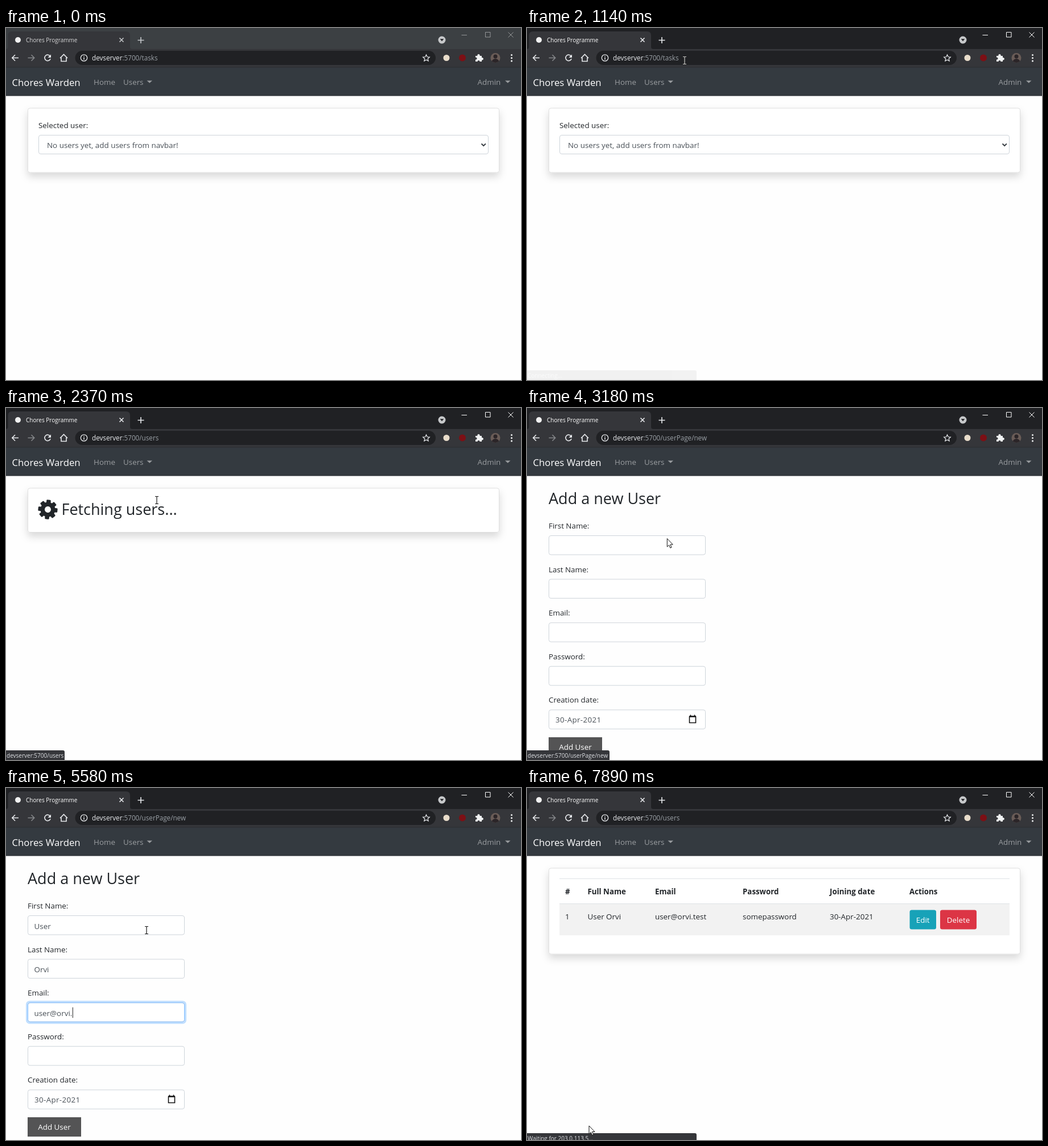
An HTML page for the animation above (8000 ms loop, 905 by 619 pixels).

```html
<!DOCTYPE html>
<html lang="en">
<head>
<meta charset="utf-8">
<title>Chores Programme</title>
<style>
  html, body { margin: 0; width: 100%; height: 100%; overflow: hidden; background: #fff; }
  svg { display: block; width: 905px; height: 619px; }
  text { font: 13.4px "Open Sans", "Noto Sans", sans-serif; fill: #212529; white-space: pre; }
  .ui { font-size: 10px; fill: #fff; }
  .url { font-size: 11.7px; fill: #9aa0a6; }
  .host { fill: #e8eaed; }
  .brand { font-size: 16.75px; fill: #fff; }
  .link { fill: #9a9da0; }
  .h2 { font-size: 27px; font-weight: 500; }
  .th { font-size: 13.3px; font-weight: 700; }
  .val { fill: #495057; }
  .btn { fill: #fff; text-anchor: middle; }
  .sug { font-size: 11.7px; fill: #fff; }
  .blue { fill: #8ab4f8; }
  .bold { font-weight: 600; }
  .line { fill: none; stroke: #e8eaed; stroke-width: 1.6; }
  .thin { fill: none; stroke: #fff; stroke-width: 1; }
  .card { fill: #fff; stroke: #dfdfdf; filter: url(#shadow); }
  .box { fill: #fff; stroke: #ced4da; }
  .ring { fill: none; stroke: #007bff; stroke-opacity: .25; stroke-width: 3; }
  #beam { mix-blend-mode: difference; }
</style>
</head>
<body>
<svg viewBox="0 0 905 619">
  <defs>
    <filter id="shadow" x="-10%" y="-30%" width="120%" height="180%">
      <feDropShadow dx="0" dy="7" stdDeviation="7" flood-color="#000" flood-opacity=".15"/>
    </filter>
    <clipPath id="face"><circle cx="860" cy="52.5" r="8.5"/></clipPath>
  </defs>
  <rect width="905" height="619" fill="#fefefe"/>

  <!-- pages -->
  <g id="todos">
    <rect class="card" x="38.5" y="141" width="828" height="113" rx="3.5"/>
    <text x="57" y="175.5">Selected user:</text>
    <rect class="box" x="57.5" y="188.5" width="790" height="33" rx="3.5"/>
    <text class="val" x="72" y="211">No users yet, add users from navbar!</text>
    <path d="M835.5 203.5l3.7 3.7 3.7-3.7" fill="none" stroke="#343a40" stroke-width="1.8"/>
  </g>
  <g id="fetch">
    <rect class="card" x="38.5" y="141" width="828" height="77.5" rx="3.5"/>
    <g id="gear" fill="#212529"></g>
    <text class="h2" x="97.5" y="188">Fetching users...</text>
  </g>
  <g id="table">
    <rect class="card" id="tableCard" x="38.5" y="141" width="828" height="151" rx="3.5"/>
    <path d="M57 159.5H848M57 203.5H848" stroke="#dee2e6"/>
    <g id="head"></g>
    <g id="row">
      <rect x="57" y="204" width="791" height="55" fill="#f2f2f2"/>
      <rect x="672.5" y="214.5" width="46.5" height="34" rx="3.5" fill="#17a2b8"/>
      <rect x="726" y="214.5" width="64" height="34" rx="3.5" fill="#dc3545"/>
      <text class="btn" x="695.7" y="237">Edit</text>
      <text class="btn" x="758" y="237">Delete</text>
    </g>
  </g>
  <g id="form">
    <text class="h2" x="38" y="169">Add a new User</text>
    <g id="fields"></g>
    <text class="val" x="50" y="553" letter-spacing=".35">30-Apr-2021</text>
    <path d="M285.5 543h11v10.500h-11zM285 542h12M287.500 539.500v3M294.500 539.500v3" fill="none" stroke="#111" stroke-width="1.6"/>
    <path id="caret" stroke="#222"/>
    <rect x="38" y="579" width="94" height="34" fill="#545455"/>
    <text class="btn" x="85" y="601">Add User</text>
  </g>

  <!-- navbar -->
  <rect y="69" width="905" height="50" fill="#343a40"/>
  <path d="M0 119H905" stroke="#23272b"/>
  <text class="brand" x="10.500" y="101.500">Chores Warden</text>
  <text class="link" x="154" y="100">Home</text>
  <g id="users" class="link">
    <text x="206" y="100" style="fill:inherit">Users</text>
    <path d="M247.500 92.500h9.500l-4.750 4.300z"/>
  </g>
  <text class="link" x="828.500" y="100">Admin</text>
  <path class="link" d="M877 92.500h9.500l-4.750 4.300z"/>
  <g id="menu">
    <rect x="199.500" y="114.500" width="141" height="71" rx="3.500" fill="#fff" stroke="#d0d0d0"/>
    <rect id="hover" x="200" width="140" height="28.500" fill="#f1f3f5"/>
    <text x="220" y="141">Add User</text>
    <text x="220" y="169.500">All Users</text>
  </g>

  <!-- browser -->
  <rect id="bar" width="905" height="37"/>
  <path d="M0 37q3.500 0 3.500-4V13q0-7 7-7H211q7 0 7 7v20q0 4 4 4z" fill="#35363a"/>
  <rect y="37" width="905" height="32" fill="#35363a"/>
  <path d="M0 69H905" stroke="#2b2d30"/>
  <circle cx="21" cy="21" r="5" fill="#f1f1f1"/>
  <g id="titles">
    <text class="ui" x="35" y="25">Chores Programme</text>
    <path class="line" d="M199.500 17.500l7 7m0-7l-7 7M231.500 21.500h11m-5.500-5.500v11" stroke-width="1.400"/>
  </g>
  <circle cx="766" cy="21" r="6.500" fill="#c6c8ca"/>
  <path d="M762.700 19.200h6.600l-3.300 4z" fill="#202124"/>
  <path id="controls" class="thin" d="M800.500 12.500h9.500M842.500 7.500h8.500v8.500h-8.500zM882.500 7.500l9 9m0-9l-9 9"/>
  <path class="line" d="M22 52.500H11m5-5.200l-5.200 5.200 5.200 5.200"/>
  <path class="line" d="M38.500 52.500h11m-5-5.200l5.200 5.200-5.200 5.200" style="stroke:#85878a"/>
  <path class="line" d="M77.500 49.500a5.200 5.200 0 1 0 .6 4.500"/>
  <path d="M79 46.500v5.500h-5.500z" fill="#e8eaed"/>
  <path class="line" d="M95 53l6.500-6.500 6.500 6.500M97 52v6.500h9V52"/>
  <rect x="121.500" y="40" width="633.500" height="25" rx="12.500" fill="#202124"/>
  <path class="line" d="M738.500 47l1.700 3.800 4.100.4-3.100 2.800.9 4.100-3.600-2.100-3.600 2.100.9-4.100-3.100-2.800 4.100-.4z" style="stroke-width:1.200" id="star"/>
  <circle cx="774" cy="52.500" r="5.500" fill="#e9ddcb"/>
  <circle cx="802" cy="52.500" r="6" fill="#7d1015"/>
  <path d="M825 49h3.500a2.200 2.200 0 1 1 4 0h3.500v3.200a2.200 2.200 0 1 1 0 4.200V59h-3.500a2 2 0 1 0-4 0H825v-3.500a2 2 0 1 0 0-3.800z" fill="#f1f3f4"/>
  <g clip-path="url(#face)">
    <rect x="850" y="43" width="20" height="20" fill="#6a5c57"/>
    <circle cx="860" cy="50" r="3.500" fill="#2b2528"/>
    <ellipse cx="860" cy="60" rx="6.500" ry="6" fill="#2b2528"/>
  </g>
  <path d="M888.500 47.500h.01m0 5.200h-.01m0 5.200h.01" stroke="#f1f3f4" stroke-width="3" stroke-linecap="round"/>

  <!-- address -->
  <g id="address">
    <circle class="line" cx="137" cy="52.500" r="5.700" style="stroke-width:1.300"/>
    <path class="line" d="M137 51.500v4.200M137 49v1.300" style="stroke-width:1.400"/>
    <text class="url" x="151" y="57"><tspan class="host">devserver</tspan><tspan id="path"></tspan></text>
  </g>
  <g id="edit">
    <circle cx="137" cy="52.500" r="4.500" fill="#f1f1f1"/>
    <rect id="sel" x="161" y="45" height="16" fill="#3b6ea8"/>
    <text id="typed" class="url" x="161" y="57">http://<tspan class="host">devserver</tspan><tspan id="tail"></tspan></text>
    <path id="urlCaret" stroke="#fff"/>
  </g>
  <g id="popup">
    <path d="M116 69H760V238q0 7-7 7H123q-7 0-7-7z" fill="#292a2d"/>
    <rect x="116" y="69" width="644" height="33" fill="#3c4043"/>
    <rect x="116" y="69" width="2.500" height="33" fill="#8ab4f8"/>
    <path class="line" d="M738.500 82.500l7 7m0-7l-7 7" style="stroke-width:1.300"/>
    <g id="hints"></g>
  </g>

  <!-- status bubble -->
  <g id="bubble">
    <path id="bubbleBox" fill="#35363a"/>
    <text id="status" class="ui" x="1" y="615" style="fill:#dfe1e5"></text>
  </g>

  <!-- pointers -->
  <g id="beam"><path d="M-3 -6.500h2.200l.8.700.8-.7H3M0-6V6M-3 6.500h2.200L0 5.800l.8.700H3" fill="none" stroke="#e8e8e8" stroke-width="1.200"/></g>
  <path id="arrow" d="M0 0V14.500l3.300-3.100 2.200 5.100 2.300-1-2.200-5H10z" fill="#fff" stroke="#111"/>
  <path id="hand" d="M-1.500 1q1.500-2 3 0v5l6 1.500q1.500.5 1.300 2L8 15H1l-5-6q1-2 2.500 0z" fill="#fff" stroke="#111"/>
</svg>
<script>
const $ = id => document.getElementById(id);
const LOOP = 8000;
const clamp = v => Math.max(0, Math.min(1, v));
const ramp = (t, a, b) => clamp((t - a) / (b - a));
const ease = k => k * k * (3 - 2 * k);
const within = (t, a, b) => t >= a && t < b;
const show = (id, on) => { $(id).style.display = on ? '' : 'none'; };
const seq = (start, step, n) => Array.from({ length: n }, (_, i) => start + step * i);
const last = (list, t) => list.filter(s => s[0] <= t).pop();

// static repeats
$('gear').innerHTML = [0, 45, 90, 135].map(a =>
  `<rect x="-3.800" y="-17" width="7.600" height="34" rx="1.500" transform="rotate(${a})"/>`).join('') +
  '<circle r="13"/><circle r="5.500" fill="#fff"/>';

const cols = [[67, '#', '1'], [106.5, 'Full Name', 'User Orvi'], [225, 'Email', 'user@orvi.test'],
  [379, 'Password', 'somepassword'], [532, 'Joining date', '30-Apr-2021'], [672, 'Actions', '']];
$('head').innerHTML = cols.map(([x, h]) => `<text class="th" x="${x}" y="187">${h}</text>`).join('');
$('row').innerHTML += cols.map(([x, , v]) => `<text x="${x}" y="231">${v}</text>`).join('');

const hint = (y, name, mid, rest) => `<circle cx="137" cy="${y - 4.5}" r="4.500" fill="#f1f1f1"/>
  <text class="sug" x="161" y="${y}">${name}<tspan fill="#9aa0a6"> - </tspan><tspan class="blue bold">${mid}</tspan><tspan class="blue">${rest}</tspan></text>`;
const site = 'http://devserver:5700';
$('hints').innerHTML = hint(90, 'Chores Programme', site, '') +
  `<circle class="line" cx="136" cy="118" r="3.500"/><path class="line" d="M139 121l3.500 3.500"/>
   <text class="sug" x="161" y="124"><tspan class="bold">${site}/</tspan><tspan fill="#9aa0a6"> - Qovimi Search</tspan></text>` +
  ['user-page', 'userPage/1', 'userPage/2'].map((p, i) =>
    hint(158 + 34 * i, 'Chores Programme', site + '/', p)).join('');

// form fields: focus time, blur time, text, key times
const fields = [
  { name: 'First Name:', on: 3300, off: 3900, text: 'User', keys: [3480, 3570, 3660, 3720] },
  { name: 'Last Name:', on: 3900, off: 4560, text: 'Orvi', keys: [4110, 4200, 4320, 4350] },
  { name: 'Email:', on: 4560, off: 6060, text: 'user@orvi.test',
    keys: [...seq(4770, 50, 4), ...seq(5070, 67.5, 5), ...seq(5550, 75, 5)] },
  { name: 'Password:', on: 6060, off: 7410, text: '•'.repeat(12), keys: seq(6450, 48, 12) },
  { name: 'Creation date:', on: 9e9, off: 9e9, text: '', keys: [] }
];
const fieldY = i => 224.5 + 76.6 * i;
$('fields').innerHTML = fields.map((f, i) => {
  const y = fieldY(i), spacing = i === 3 ? .75 : 0;
  return `<text x="38" y="${y - 12.5}">${f.name}</text>
    <rect class="box" x="38.500" y="${y}" width="275" height="33.500" rx="3.500"/>
    <g id="ring${i}"><rect class="ring" x="36.500" y="${y - 2}" width="279" height="37.500" rx="5"/>
    <rect x="38.500" y="${y}" width="275" height="33.500" rx="3.500" fill="none" stroke="#80bdff"/></g>
    <text class="val" id="val${i}" x="49.500" y="${y + 23}" letter-spacing="${spacing}"></text>`;
}).join('');

const pages = [[0, 'todos'], [2340, 'fetch'], [2550, 'table'], [2940, 'form'], [7440, 'fetch'], [7650, 'table']];
const paths = [[0, '/tasks'], [735, ''], [1050, '/tasks'], [2340, '/users'], [2940, '/userPage/new'], [7440, '/users']];
const usersUrl = 'devserver:5700/users', formUrl = 'devserver:5700/userPage/new';
// from, to, text, width
const bubbles = [[850, 1075, 'Connecting...', 298], [1800, 1980, formUrl, 145], [1980, 2550, usersUrl, 103],
  [2790, 3200, formUrl, 145], [7620, 8200, 'Waiting for 203.0.113.5...', 298]];
// time, x, y, pointer
const track = [[330, 340, 180, 'arrow'], [450, 277, 57, 'beam'], [1170, 277, 57, 'arrow'], [1470, 230, 97, 'hand'],
  [1620, 230, 97, 'hand'], [1860, 254, 133, 'hand'], [1950, 254, 135, 'hand'], [2130, 265, 162, 'hand'],
  [2340, 265, 162, 'beam'], [2460, 265, 162, 'arrow'], [2640, 232, 97, 'hand'], [2730, 232, 97, 'hand'],
  [2850, 243, 136, 'hand'], [2940, 243, 136, 'arrow'], [3270, 247, 250, 'beam'], [7170, 247, 250, 'arrow'],
  [7380, 109, 594, 'arrow']];

function drawPointer(t) {
  const i = track.findIndex(p => p[0] > t);
  const a = track[i < 0 ? track.length - 1 : Math.max(0, i - 1)], b = i < 0 ? a : track[i];
  const k = a === b ? 0 : ease(ramp(t, a[0], b[0]));
  const x = a[1] + (b[1] - a[1]) * k, y = a[2] + (b[2] - a[2]) * k;
  for (const id of ['beam', 'arrow', 'hand']) {
    show(id, t >= 330 && a[3] === id);
    $(id).setAttribute('transform', `translate(${x} ${y})`);
  }
}

function drawAddress(t) {
  const editing = within(t, 450, 735), left = Math.ceil(5 * (1 - ramp(t, 510, 640)));
  show('address', !editing);
  show('star', !editing);
  show('edit', editing);
  $('path').textContent = ':5700' + last(paths, t)[1];
  $('tail').textContent = ':5700/' + 'tasks'.slice(0, left);
  if (editing) {
    const w = $('typed').getComputedTextLength();
    $('sel').setAttribute('width', t < 510 ? w : 0);
    $('urlCaret').setAttribute('d', `M${161.5 + w} 44.500v16`);
  }
  show('popup', within(t, 480, 735));
  $('popup').style.opacity = 1 - ramp(t, 650, 732);
}

function drawForm(t) {
  let caret = '';
  fields.forEach((f, i) => {
    const val = $('val' + i);
    val.textContent = f.text.slice(0, f.keys.filter(k => k <= t).length);
    $('ring' + i).style.opacity = ramp(t, f.on, f.on + 100) * (1 - ramp(t, f.off, f.off + 100));
    if (within(t, f.on, f.off) && !within(t, 6300, 6450)) {
      const x = 50.5 + (val.textContent ? val.getComputedTextLength() : 0);
      caret = `M${x} ${fieldY(i) + 8}v18.500`;
    }
  });
  $('caret').setAttribute('d', caret);
}

function drawBubble(t) {
  const b = bubbles.find(b => within(t, b[0], b[1] + 70));
  const now = bubbles.find(b => within(t, b[0], b[1])) || b;
  show('bubble', !!now);
  if (!now) return;
  const [from, to, text, w] = now;
  $('status').textContent = text;
  $('bubbleBox').setAttribute('d', `M0 602H${w - 3}q3 0 3 3V619H0z`);
  $('bubble').style.opacity = (from === 1980 ? 1 : ramp(t, from, from + 60)) * (1 - ramp(t, to, to + 70));
  $('bubble').setAttribute('transform', `translate(0 ${from > 7000 ? 5 * ramp(t, 7740, 7890) : 0})`);
}

function draw(t) {
  const page = last(pages, t), active = t >= 330;
  for (const id of ['todos', 'fetch', 'table', 'form']) show(id, page[1] === id);
  $('bar').setAttribute('fill', active ? '#202124' : '#3c4043');
  $('titles').style.opacity = active ? 1 : .8;
  $('controls').style.opacity = active ? 1 : .45;
  $('gear').setAttribute('transform', `translate(73.500 178.500) rotate(${(t - page[0]) * .18})`);
  show('row', t > 7000);
  $('tableCard').setAttribute('height', t > 7000 ? 151 : 95);

  const open = within(t, 1530, 2340) || within(t, 2670, 2940);
  show('menu', open);
  $('users').style.fill = open ? '#ccced0' : '';
  const second = within(t, 1980, 2340);
  show('hover', second || within(t, 1800, 1980) || t > 2790);
  $('hover').setAttribute('y', second ? 150 : 121.5);

  drawAddress(t);
  if (page[1] === 'form') drawForm(t);
  drawBubble(t);
  drawPointer(t);
}

const start = performance.now();
(function tick() {
  draw((performance.now() - start) % LOOP);
  requestAnimationFrame(tick);
})();
</script>
</body>
</html>
```
